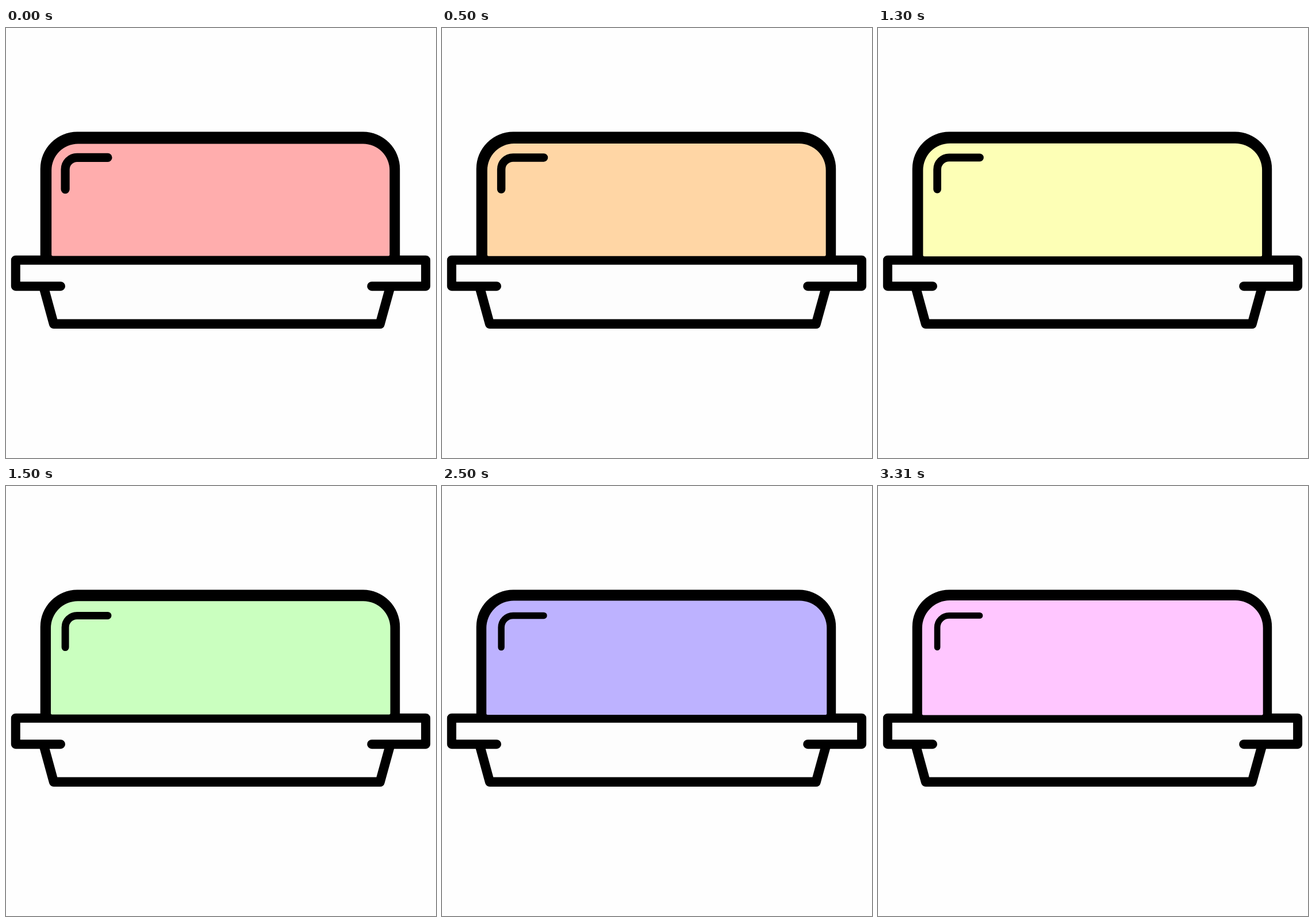
These frames come from a looping animation (748x748 px, 3510 ms). An HTML page:

```html
<!DOCTYPE html>
<html lang="en">
<head>
<meta charset="utf-8">
<title>Butter dish</title>
<style>
  html, body { margin: 0; width: 100%; height: 100%; overflow: hidden; background: #fefefe; }
  svg { display: block; width: 100%; height: 100%; }
</style>
</head>
<body>
<svg viewBox="0 0 748 748">
  <!-- tray -->
  <path d="M17 404H730V449H667L651 514.5H83L67 449H17Z" fill="#fdfdfd"/>
  <g fill="none" stroke="#000" stroke-linecap="round" stroke-linejoin="round">
    <path d="M66.4 454L83 514.7H650.6L667.4 454" stroke-width="16.4"/>
    <path d="M95 449.2H16.8V403.7H730.1V449.2H636.2" stroke-width="16"/>
  </g>
  <!-- lid -->
  <path d="M59.7 404V245A64.3 64.3 0 0 1 124 180.6H621A64.3 64.3 0 0 1 685.2 245V404Z"/>
  <path id="lid"/>
  <path id="shine" d="M103.1 280.6V246A20.6 20.6 0 0 1 123.7 225.4H177" fill="none" stroke="#000" stroke-linecap="round"/>
</svg>
<script>
  const STEP = 500, LOOP = 3510;
  const colors = ['#ffadad', '#ffd6a5', '#fdffb6', '#caffbf', '#9bf6ff', '#bdb2ff', '#ffc6ff'];
  const lid = document.getElementById('lid');
  const shine = document.getElementById('shine');
  let shown = -1;

  // Each colour spreads a little further into the outline.
  function lidPath(grow) {
    const left = 79.2 - grow, right = 667.3 + grow;
    const top = 201.5 - grow, bottom = 396.5 + grow * 0.8;
    const r = 46 + grow * 0.8, c = 2;
    return `M${left + c} ${bottom}Q${left} ${bottom} ${left} ${bottom - c}V${top + r}` +
      `A${r} ${r} 0 0 1 ${left + r} ${top}H${right - r}` +
      `A${r} ${r} 0 0 1 ${right} ${top + r}V${bottom - c}` +
      `Q${right} ${bottom} ${right - c} ${bottom}Z`;
  }

  function draw(time) {
    const i = Math.min(colors.length - 1, Math.floor((time % LOOP) / STEP));
    if (i === shown) return;
    shown = i;
    lid.setAttribute('d', lidPath(i * 0.4));
    lid.setAttribute('fill', colors[i]);
    shine.setAttribute('stroke-width', 15.2 - i * 0.75);
  }

  const start = performance.now();
  function tick() {
    draw(performance.now() - start);
    requestAnimationFrame(tick);
  }
  tick();
</script>
</body>
</html>
```
